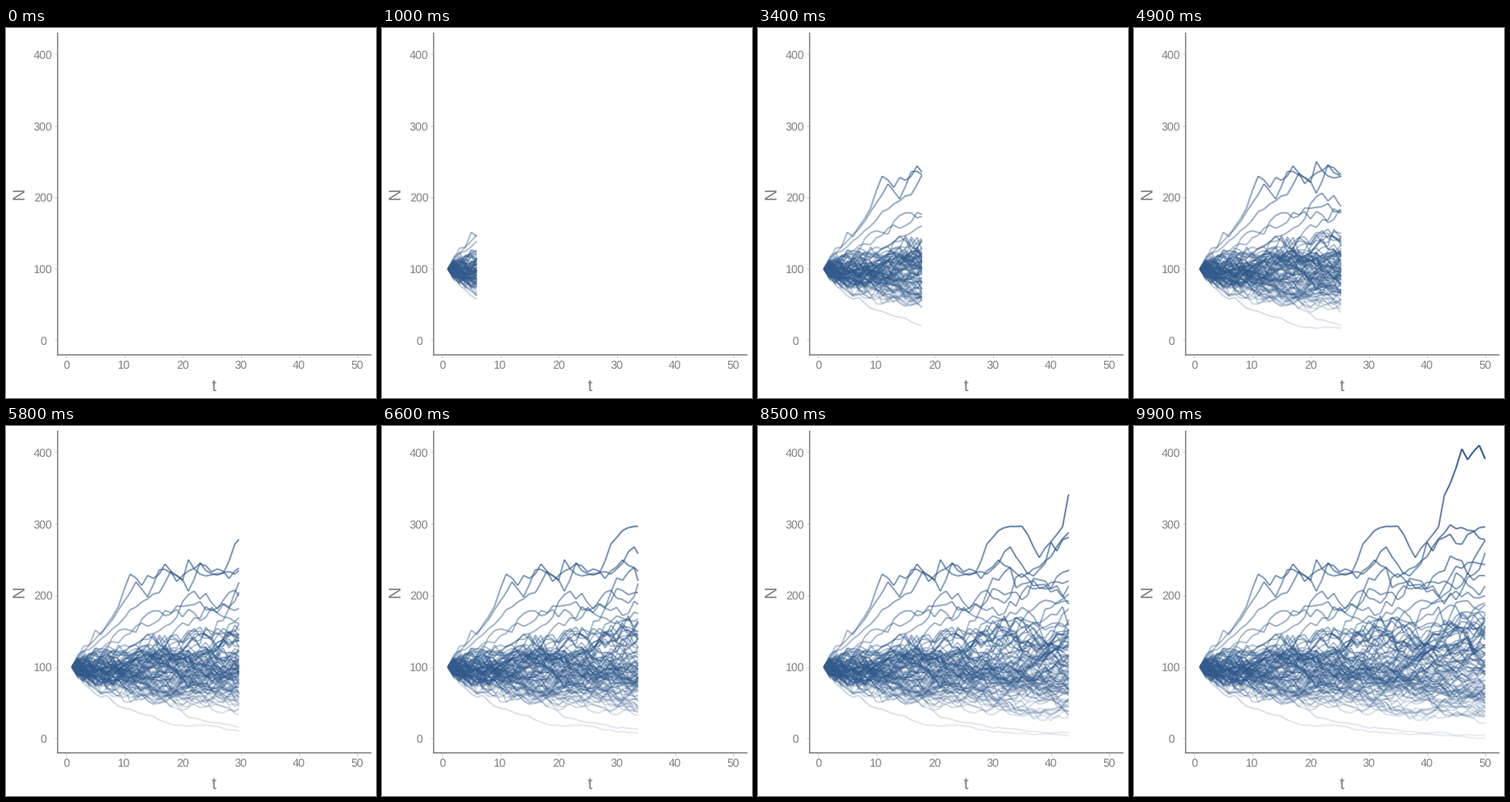
Animation of 480x480 px, one loop 10 s. Source, as a matplotlib script:

```python
import numpy as np
import matplotlib.pyplot as plt
from matplotlib.animation import FuncAnimation
from matplotlib.collections import LineCollection
from matplotlib.colors import to_rgb

SIZE, DPI = 480, 100
FRAMES, INTERVAL = 100, 100
WALKS, STEPS, TOP = 100, 50, 410
GREY, TICK, BLUE = "#7f7f7f", "#cccccc", "#305a8c"
TIMES = np.arange(1, STEPS + 1)

plt.rcParams["text.hinting"] = "none"
rng = np.random.default_rng(7)


def px(t):
    return 78 + 7.55 * np.asarray(t)


def py(n):
    return 405.4 - 0.9275 * np.asarray(n)


def pt(pixels):
    return pixels * 72 / DPI


# Key points (t, n) of the few walks that stand clear of the crowd.
LEADER = [(9, 180), (12, 219), (14, 198), (16, 236), (20, 221), (21, 250),
          (23, 230), (27, 231), (29, 272), (32, 295), (35, 297), (38, 253),
          (42, 296), (43, 340), (46, 405), (47, 390), (49, 410), (50, 391)]
RUNNER_UP = [(16, 204), (18, 234), (21, 206), (23, 246), (29, 230),
             (33, 268), (36, 230), (44, 299), (50, 278)]
LOWEST = [(9, 45), (18, 20), (31, 10), (50, 0)]


def bridge(knots, spread):
    """Random walk from 100 at t=1 pinned to the given knots."""
    knots = [(1, 100)] + knots
    walk = np.interp(TIMES, *zip(*knots))
    for (t0, n0), (t1, n1) in zip(knots, knots[1:]):
        k = t1 - t0
        noise = np.cumsum(rng.normal(0, spread * np.sqrt((n0 + n1) / 2), k))
        walk[t0:t1] += noise - noise[-1] * np.arange(1, k + 1) / k
    return np.clip(walk, 0, TOP)


def drift(spread=0.85):
    """Neutral population walk: step variance grows with size."""
    walk = [100.0]
    for _ in TIMES[1:]:
        n = walk[-1]
        walk.append(max(0, n + rng.normal(0, spread * np.sqrt(n))))
    return np.array(walk)


def build_walks():
    walks = [bridge(LEADER, 0.2), bridge(RUNNER_UP, 0.3),
             bridge(LOWEST, 0.4), bridge([(24, 24), (50, 5)], 0.4)]
    climbers = zip(np.geomspace(240, 150, 8), np.geomspace(296, 187, 8))
    walks += [bridge([(30, mid), (50, end)], 0.75) for mid, end in climbers]

    root = np.sqrt(TIMES - 1)
    ceiling, floor = 100 + 13.5 * root, 100 * np.exp(-0.24 * root)
    while len(walks) < WALKS:
        walk = drift()
        if np.all((walk <= ceiling) & (walk >= floor)):
            walks.append(walk)
    return rng.permutation(np.array(walks))


walks = build_walks()
points = np.stack([np.broadcast_to(px(TIMES), walks.shape), py(walks)], axis=-1)
segments = np.stack([points[:, :-1], points[:, 1:]], axis=2)
colors = np.empty((WALKS, STEPS - 1, 4))
colors[..., :3] = to_rgb(BLUE)
colors[..., 3] = 0.1 + 0.9 * walks[:, :-1] / TOP

fig = plt.figure(figsize=(SIZE / DPI, SIZE / DPI), dpi=DPI, facecolor="white")
ax = fig.add_axes([0, 0, 1, 1])
ax.set(xlim=(0, SIZE), ylim=(SIZE, 0))
ax.axis("off")


def rule(x, y, color, width):
    ax.plot(x, y, color=color, lw=pt(width), solid_capstyle="butt", zorder=1)


def label(x, y, text, size, **kw):
    ax.text(x, y, text, fontsize=pt(size), family="Liberation Sans",
            color=GREY, ha="center", va="baseline", **kw)


for n in range(0, 401, 100):
    rule([63, 67], [py(n)] * 2, TICK, 1)
    label(48, py(n) + 5.3, str(n), 14.67)
for t in range(0, 51, 10):
    rule([px(t)] * 2, [424, 428], TICK, 1)
    label(px(t), 442, str(t), 14.67)
rule([67, 67], [6, 425], GREY, 1.6)
rule([66.2, 474], [424, 424], GREY, 1.6)
label(270, 471, "t", 22)
label(23, 215, "N", 22, rotation=90, rotation_mode="anchor")

lines = LineCollection([], linewidths=pt(2.1), capstyle="butt", zorder=3)
ax.add_collection(lines, autolim=False)


def update(i):
    t = (STEPS - 1) * i / (FRAMES - 1)
    whole = int(t + 1e-9)
    part = t - whole
    count = whole + (part > 1e-6)
    shown = segments[:, :count].copy()
    if count > whole:
        start, end = segments[:, whole, 0], segments[:, whole, 1]
        shown[:, whole, 1] = start + part * (end - start)
    lines.set_segments(shown.reshape(-1, 2, 2))
    lines.set_color(colors[:, :count].reshape(-1, 4))
    return [lines]


anim = FuncAnimation(fig, update, frames=FRAMES, interval=INTERVAL,
                     repeat=True, repeat_delay=0, blit=False)
plt.show()
```
